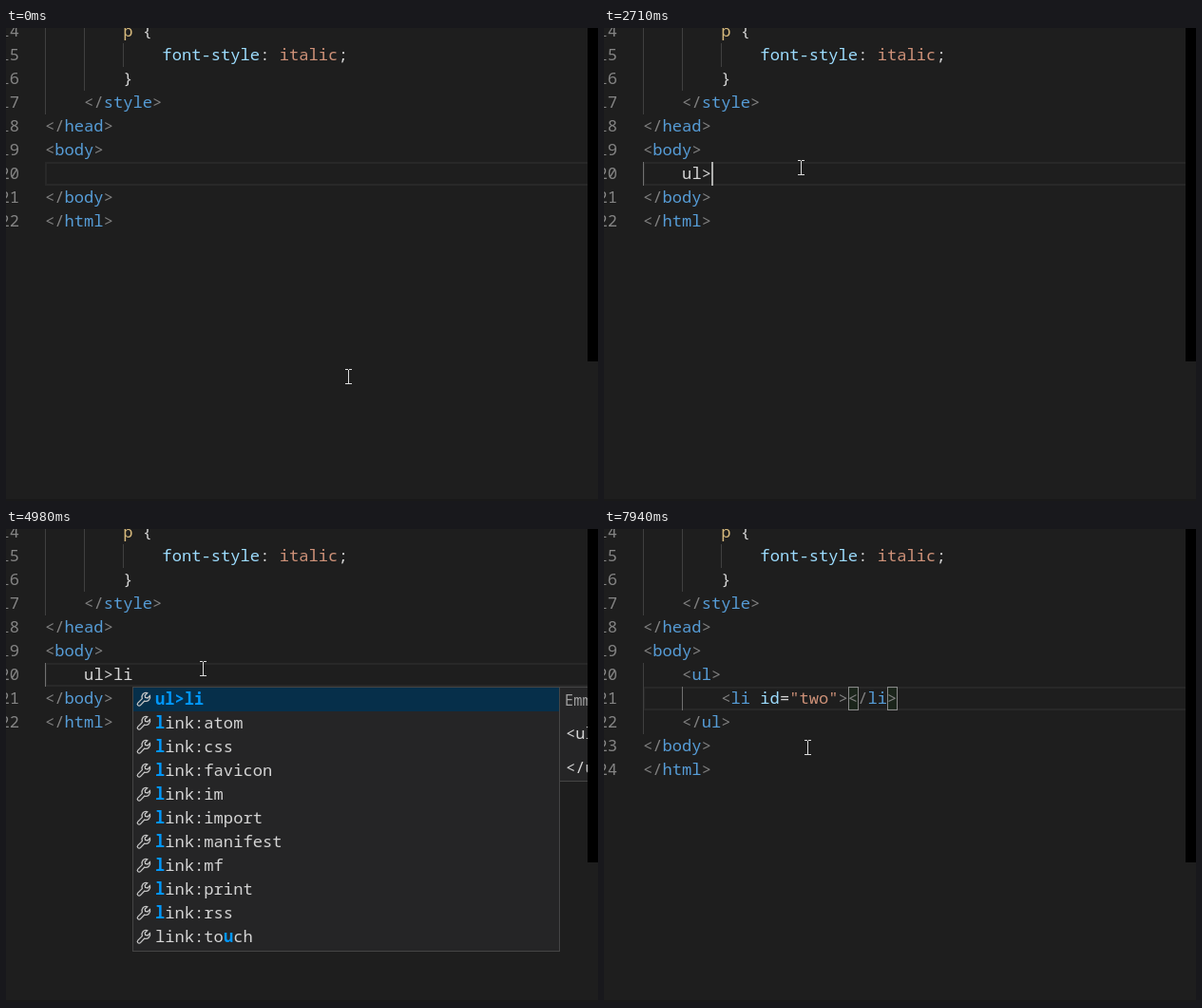
These frames come from a looping animation (623x498 px, 8 s). An HTML page with a canvas:

```html
<!DOCTYPE html>
<html lang="en">
<head>
<meta charset="utf-8">
<title>Typing an abbreviation in an editor</title>
<style>
  html, body { margin: 0; width: 100%; height: 100%; overflow: hidden; background: #1e1e1e; }
  canvas { display: block; }
</style>
</head>
<body>
<canvas id="stage" width="623" height="498"></canvas>
<script>
const ctx = document.getElementById('stage').getContext('2d');
const LOOP = 8000, LEFT = 41, CHAR = 10.28, ROW = 25, EDGE = 612;
const FAMILY = '"Noto Sans Mono", monospace';
const FONT = `17.13px ${FAMILY}`, BOLD = `bold ${FONT}`, SMALL = `15.4px ${FAMILY}`;
const COLOR = {
  punct: '#808080', tag: '#569cd6', attr: '#9cdcfe', value: '#ce9178',
  selector: '#d7ba7d', text: '#d4d4d4', number: '#858585', match: '#0097fb',
  guide: '#404040', activeGuide: '#707070'
};

const colX = col => LEFT + col * CHAR;
const rowY = line => 141 + (line - 20) * ROW;

// Latest entry of a [time, value] list that has started.
const at = (steps, t) => steps.filter(s => s[0] <= t).pop()[1];

const typed = [[0, ''], [1390, 'u'], [1770, 'ul'], [2710, 'ul>'], [3190, 'ul>l'], [3490, 'ul>li'],
  [5430, 'ul>li#'], [6290, 'ul>li#t'], [6370, 'ul>li#tw'], [6610, 'ul>li#two']];

const links = ['atom', 'css', 'favicon', 'im', 'import', 'manifest', 'mf', 'print', 'rss', 'touch']
  .map(name => 'link:' + name);

const popups = [[0, null],
  [1390, { word: 'u', more: ['ul+'], hit: 'u' }],
  [1770, { word: 'ul', more: ['ul+'], hit: 'ul' }],
  [2710, null],
  [3260, { word: 'ul>l', more: ['link', ...links], hit: 'l' }],
  [3490, { word: 'ul>li', more: links, hit: 'l' }],
  [5430, null],
  [6290, { word: 'ul>li#t', more: [], hit: '' }],
  [6460, { word: 'ul>li#tw', more: [], hit: '' }],
  [6710, { word: 'ul>li#two', more: [], hit: '' }],
  [7010, null]];

const caret = [[0, false], [610, true], [1160, false], [1390, true], [2250, false], [2710, true],
  [3970, false], [4430, true], [4980, false], [5430, true], [5910, false], [6290, true], [7480, false]];

const pointer = [[0, [360, 367]], [70, [310, 296]], [150, [248, 207]], [230, [212, 153]], [310, [204, 142]],
  [540, [217, 139]], [610, [210, 144]], [680, [207, 147]],
  [7780, [208, 160]], [7860, [212, 202]], [7940, [214, 230]]];

const wrench = new Path2D('M6.3 7.6 L1.8 12.1 A1.8 1.8 0 0 0 4.4 14.6 L8.8 10.1 ' +
  'C12 11 15.5 8.5 14.5 4.6 L12 7 L9.6 6.5 L9.2 4.2 L11.6 1.7 C8 .6 5.2 3.6 6.3 7.6 Z');

function box(x, y, w, h, color) {
  ctx.fillStyle = color;
  ctx.fillRect(x, y, w, h);
}

function frame(x, y, w, h, color, width = 1) {
  ctx.strokeStyle = color;
  ctx.lineWidth = width;
  ctx.strokeRect(x, y, w, h);
}

function write(text, x, baseline, color, font = FONT) {
  ctx.font = font;
  ctx.fillStyle = color;
  ctx.fillText(text, x, baseline);
}

// Parts alternate colour name and text.
function code(line, col, ...parts) {
  for (let i = 0; i < parts.length; i += 2) {
    write(parts[i + 1], colX(col), rowY(line) + 18, COLOR[parts[i]]);
    col += parts[i + 1].length;
  }
}

const tag = (line, col, name, open = '<') => code(line, col, 'punct', open, 'tag', name, 'punct', '>');

function guide(col, from, to, color = COLOR.guide) {
  box(Math.round(colX(col)), rowY(from), 1, (to - from + 1) * ROW, color);
}

function drawPage(t, expanded) {
  const last = expanded ? 24 : 22;
  ctx.textAlign = 'right';
  for (let n = 14; n <= last; n++) write(n, 14, rowY(n) + 18, COLOR.number);
  ctx.textAlign = 'left';

  frame(42, rowY(expanded ? 21 : 20) + 1, 600, 23, '#282828', 2);
  guide(0, 14, 17);
  guide(1 * 4, 14, 16);
  guide(2 * 4, 15, 15);

  code(14, 8, 'selector', 'p', 'text', ' {');
  code(15, 12, 'attr', 'font-style', 'text', ': ', 'value', 'italic', 'text', ';');
  code(16, 8, 'text', '}');
  tag(17, 4, 'style', '</');
  tag(18, 0, 'head', '</');
  tag(19, 0, 'body');
  tag(last - 1, 0, 'body', '</');
  tag(last, 0, 'html', '</');
}

function drawTyped(text) {
  if (text) guide(0, 20, 20, COLOR.activeGuide);
  code(20, 4, 'text', text);
}

function drawList(t) {
  guide(0, 20, 22);
  guide(4, 21, 21, COLOR.activeGuide);
  if (t >= 7080) {
    for (const col of [21, 25]) {
      box(colX(col), 166, CHAR, ROW, 'rgba(0,100,0,.1)');
      frame(Math.round(colX(col)) + .5, 166.5, 10, 24, '#888888');
    }
  }
  tag(20, 4, 'ul');
  code(21, 8, 'punct', '<', 'tag', 'li', 'attr', ' id', 'text', '=', 'value', '"two"', 'punct', '></',
    'tag', 'li', 'punct', '>');
  tag(22, 4, 'ul', '</');
}

function drawItem(text, hit, x, y) {
  ctx.save();
  ctx.translate(x + 4, y + 4);
  ctx.strokeStyle = '#c5c5c5';
  ctx.lineWidth = 1.3;
  ctx.stroke(wrench);
  ctx.restore();
  const start = hit ? text.indexOf(hit) : -1;
  const textX = x + 24, baseline = y + 18;
  if (start < 0) return write(text, textX, baseline, COLOR.text);
  const end = start + hit.length;
  write(text.slice(0, start), textX, baseline, COLOR.text);
  write(hit, textX + start * CHAR, baseline, COLOR.match, BOLD);
  write(text.slice(end), textX + end * CHAR, baseline, COLOR.text);
}

function drawPopup({ word, more, hit }) {
  const x = Math.floor(colX(4 + word.length) + .3), top = 166, width = 449;
  const nested = word.includes('>');
  const docX = x + width, docH = nested ? 99 : 63;

  box(docX, top, 300, docH, '#252526');
  frame(docX + .5, top + .5, 300, docH, '#454545');
  write('Emmet Abbreviation', docX + 6, 186, '#a0a0a0', SMALL);
  write(nested ? '<ul>' : `<${word}></${word}>`, docX + 7, 221, COLOR.text);
  if (nested) write('</ul>', docX + 7, 257, COLOR.text);

  const height = (more.length + 1) * ROW + 3;
  box(x, top, width, height, '#252526');
  box(x + 1, top + 1, width - 1, ROW, '#062f4a');
  frame(x + .5, top + .5, width, height, '#454545');
  drawItem(word, word, x, 167);
  more.forEach((item, i) => {
    drawItem(item, item === 'link:touch' ? 'u' : hit, x, 167 + (i + 1) * ROW);
  });
}

function drawPointer([x, y]) {
  box(x, y - 7, 1, 15, '#dcdcdc');
  for (const end of [y - 8, y + 7]) {
    box(x - 3, end, 3, 1, '#dcdcdc');
    box(x + 1, end, 3, 1, '#dcdcdc');
  }
}

function draw(t) {
  const expanded = t >= 7010;
  const text = at(typed, t), popup = at(popups, t);
  box(0, 0, 623, 498, '#1e1e1e');
  drawPage(t, expanded);
  if (expanded) drawList(t);
  else drawTyped(text);
  if (at(caret, t)) {
    const col = expanded ? 21 : 4 + text.length;
    box(Math.floor(colX(col) + .3), rowY(expanded ? 21 : 20), 2, ROW, '#aeafad');
  }
  if (popup) drawPopup(popup);
  box(EDGE, 0, 11, 498, '#1e1e1e');
  box(EDGE, 0, 11, 351, '#000000');
  box(0, 496, 623, 2, '#191919');
  drawPointer(at(pointer, t));
}

const begin = performance.now();
function tick() {
  draw((performance.now() - begin) % LOOP);
  requestAnimationFrame(tick);
}
tick();
</script>
</body>
</html>
```
